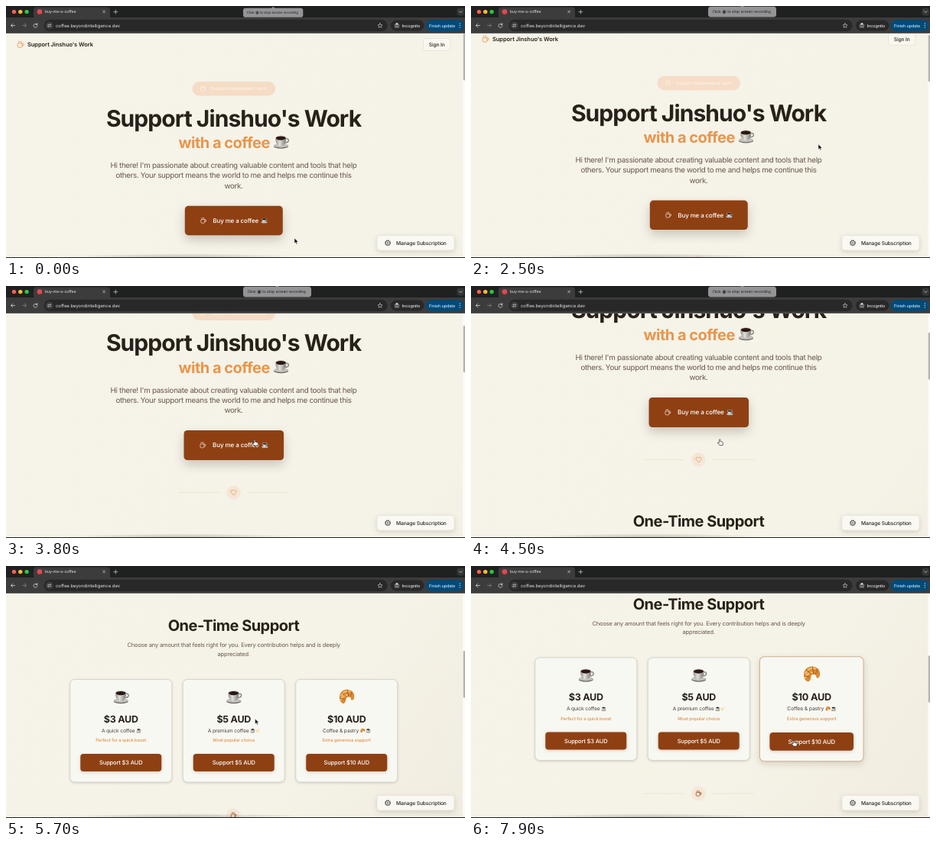
Recreate the animation shown at these times as an HTML page. Size 600 by 330 pixels, loop 8 s.

```html
<!DOCTYPE html>
<html lang="en">
<head>
<meta charset="utf-8">
<title>Coffee page</title>
<style>
  html, body { margin: 0; width: 100%; height: 100%; overflow: hidden; background: #f5f2e7; }
  svg { display: block; width: 600px; height: 330px; }
  text { font-family: Inter, "Open Sans", sans-serif; text-rendering: geometricPrecision; white-space: pre; }
  .line { fill: none; stroke-linecap: round; stroke-linejoin: round; }
  .zoom { transform-box: fill-box; transform-origin: center; }
</style>
</head>
<body>
<svg id="stage" viewBox="0 0 600 330" xmlns="http://www.w3.org/2000/svg"></svg>
<script>
const LOOP = 8000, STEP = 100;
const INK = '#27211a', SOFT = '#67584e', ORANGE = '#e8964b', BROWN = '#8e4013';

// y is the middle of the line; the baseline sits 0.36em lower
const text = (s, x, y, size, { w = 400, c = INK, a = 'start', ls = -0.015 } = {}) =>
  `<text x="${x}" y="${y + size * 0.36}" font-size="${size}" font-weight="${w}" fill="${c}" text-anchor="${a}" letter-spacing="${ls * size}">${s}</text>`;
const mid = (s, x, y, size, o) => text(s, x, y, size, { a: 'middle', ...o });
const rect = (x, y, w, h, r, fill, more = '') =>
  `<rect x="${x}" y="${y}" width="${w}" height="${h}" rx="${r}" fill="${fill}" ${more}/>`;
const dot = (x, y, r, fill, more = '') => `<circle cx="${x}" cy="${y}" r="${r}" fill="${fill}" ${more}/>`;
const ring = (x, y, r, c, w, more = '') => dot(x, y, r, 'none', `stroke="${c}" stroke-width="${w}" ${more}`);
const line = (d, c, w = 0.8) => `<path class="line" d="${d}" stroke="${c}" stroke-width="${w}"/>`;
const use = (id, x, y, size) =>
  `<use href="#${id}" transform="translate(${x} ${y}) scale(${size / 20})"/>`;

// 24-unit line icons, centred on x, y
const ICONS = {
  cup: 'M10 2v2M14 2v2M6 2v2M16 8a1 1 0 0 1 1 1v8a4 4 0 0 1-4 4H7a4 4 0 0 1-4-4V9a1 1 0 0 1 1-1h14a4 4 0 1 1 0 8h-1',
  heart: 'M19 14c1.5-1.5 3-3.2 3-5.5A5.5 5.5 0 0 0 16.5 3c-1.8 0-3 .5-4.5 2-1.5-1.5-2.7-2-4.5-2A5.5 5.5 0 0 0 2 8.5c0 2.3 1.5 4 3 5.5l7 7Z'
};
const icon = (name, x, y, size, c) =>
  `<g transform="translate(${x - size / 2} ${y - size / 2}) scale(${size / 24})">${line(ICONS[name], c, 2)}</g>`;

const defs = `<defs>
  <linearGradient id="bg" x1="0" y1="0" x2="1" y2="1">
    <stop offset="0" stop-color="#f6f3e9"/><stop offset=".65" stop-color="#f5f2e7"/><stop offset="1" stop-color="#efe9dd"/>
  </linearGradient>
  <linearGradient id="china" x1="0" y1="0" x2="1" y2="0">
    <stop offset="0" stop-color="#8f8c87"/><stop offset=".4" stop-color="#e2e0dc"/><stop offset="1" stop-color="#76736e"/>
  </linearGradient>
  <radialGradient id="haze"><stop offset="0" stop-color="#555" stop-opacity=".4"/><stop offset="1" stop-color="#555" stop-opacity="0"/></radialGradient>
  <clipPath id="view"><rect x="0" y="35.8" width="600" height="294.2"/></clipPath>
  <g id="coffee">
    <ellipse cx="0" cy="6" rx="9.3" ry="3" fill="#6f6b66"/>
    <ellipse cx="0" cy="5" rx="9.3" ry="2.7" fill="#c4c1bc"/>
    <path d="M6-3.5c5-1.5 5 5-.8 5" fill="none" stroke="#8b8883" stroke-width="1.4"/>
    <path d="M-7.2-4.5C-7 2-4.5 5.8-.3 5.8S6.500 2 6.700-4.5z" fill="url(#china)"/>
    <ellipse cx="-.2" cy="-4.5" rx="7.1" ry="3.2" fill="#d6d3ce"/>
    <ellipse cx="-.2" cy="-4.3" rx="6.4" ry="2.6" fill="#2c1a12"/>
  </g>
  <g id="croissant">
    <path d="M-9 1C-9.5-5-4-10 2-8.8C8-8 11-3 9.5 2c-.6 2-2 3-3 2.5C5 4 6 1 3.5.5C0 0-.5 2-1 4.5C-1.500 8-3.5 9.8-5.5 8.5C-8 7-9 4-9 1z" fill="#d98a36"/>
    <path d="M-7-1C-5-6 0-8 4-6.5M-7.5 4c2-4 5-6 8-6" fill="none" stroke="#f2bd6c" stroke-width="2" stroke-linecap="round"/>
    <path d="M-6-5l5 4.5M1-8.5L2.5 0M7-6L4.5 0M-9 2l7 1.5" fill="none" stroke="#a85c1c" stroke-width=".9"/>
  </g>
  <path id="sparkle" d="M-2-7L0 0l7 2L0 4l-2 7-2-7-6-2 6-2zM6-9l1 3 3 1-3 1-1 3-1-3-3-1 3-1z" fill="#f3d48a"/>
</defs>`;

const separator = (y, name, c) =>
  line(`M225 ${y}H279M316 ${y}H370`, '#e4dccb', 0.6) + dot(297.5, y, 9.2, '#f5e6d6') + icon(name, 297.5, y, 8.6, c);

const CARDS = [
  { x: 150.25, sum: 3, emoji: 'coffee', name: 'A quick coffee', end: 168.5, extra: [['coffee', 173.4]], note: 'Perfect for a quick boost' },
  { x: 297.75, sum: 5, emoji: 'coffee', name: 'A premium coffee', end: 317.5, extra: [['coffee', 322.4], ['sparkle', 329.2]], note: 'Most popular choice' },
  { x: 445.25, sum: 10, emoji: 'croissant', name: 'Coffee &amp; pastry', end: 461, extra: [['croissant', 466.2], ['coffee', 473.4]], note: 'Extra generous support' }
];
const card = (c, i) => `<g id="card${i}" class="zoom">
  ${rect(c.x - 66.5, 493.5, 133, 134.5, 6, '#f8f8f3', `id="box${i}" stroke-width="1"`)}
  <g id="pic${i}" class="zoom">${use(c.emoji, c.x, 516, 20.5)}</g>
  ${mid(`$${c.sum} AUD`, c.x, 545, 12.5, { w: 700, ls: -0.02 })}
  ${text(c.name, c.end, 560.5, 6.67, { c: '#4c423a', a: 'end', ls: -0.02 })}
  ${c.extra.map(([id, x]) => use(id, x, 560.5, 6.4)).join('')}
  ${mid(c.note, c.x, 573, 5.83, { w: 500, c: '#e08f45', ls: -0.018 })}
  <g id="pay${i}" class="zoom" style="filter:drop-shadow(0 1.5px 2px #8e401340)">
    ${rect(c.x - 53, 591, 106, 23, 4, BROWN)}${mid(`Support $${c.sum} AUD`, c.x, 602.5, 7.5, { w: 500, c: '#fff', ls: -0.02 })}
  </g></g>`;

const page = `<g clip-path="url(#view)"><g id="page">
  ${rect(0, 0, 600, 900, 0, 'url(#bg)')}
  ${icon('cup', 19, 50.5, 10, ORANGE)}
  ${text("Support Jinshuo's Work", 28, 50.5, 7.5, { w: 600, ls: -0.008 })}
  ${rect(545.5, 42.5, 35.5, 16, 3.5, '#f9f7ef', 'stroke="#dfd9cb" stroke-width=".6"')}
  ${mid('Sign In', 563.2, 50.5, 6.67, { w: 500 })}
  <g id="badge">${rect(243.5, 99, 108.5, 18.5, 9.25, '#f5dcc5')}
    ${icon('cup', 257.5, 108, 8, '#fdf3e8')}
    ${text('Support independent work', 267.5, 108.2, 5.83, { w: 500, c: '#fdf3e8', ls: -0.005 })}</g>
  ${mid("Support Jinshuo's Work", 297.5, 147, 30, { w: 700, ls: -0.031 })}
  ${text('with a coffee', 225.5, 179, 20, { w: 700, c: ORANGE, ls: -0.025 })}
  ${use('coffee', 359.5, 177.5, 20.5)}
  ${["Hi there! I'm passionate about creating valuable content and tools that help",
     'others. Your support means the world to me and helps me continue this', 'work.']
    .map((s, i) => mid(s, 297.5, 208.6 + i * 13.33, 9.8, { c: SOFT, ls: -0.033 })).join('')}
  <g id="hero" class="zoom" style="filter:drop-shadow(0 6px 7px #00000030)">
    ${rect(233.8, 261.8, 128, 38.4, 4.6, BROWN)}${icon('cup', 258, 281, 8.6, '#f7e6d8')}
    ${text('Buy me a coffee', 270.5, 281, 7.95, { w: 500, c: '#fff' })}${use('coffee', 337.5, 281, 8.6)}
  </g>
  ${separator(343, 'heart', ORANGE)}
  ${mid('One-Time Support', 297.5, 423, 20, { w: 700, ls: -0.027 })}
  ${['Choose any amount that feels right for you. Every contribution helps and is deeply', 'appreciated.']
    .map((s, i) => mid(s, 297.7, 448.3 + i * 11.67, 7.5, { c: SOFT, ls: -0.02 })).join('')}
  ${CARDS.map(card).join('')}
  ${separator(671.5, 'cup', BROWN)}
</g>
${rect(597, 35, 3, 295, 0, '#fafaf6')}${rect(597.7, 36, 2.3, 61.5, 1.1, '#b4b4b0', 'id="thumb"')}
<g style="filter:drop-shadow(0 2px 3px #0002)">${rect(485, 300.5, 101, 19.5, 4, '#faf8f2', 'stroke="#e6e1d6" stroke-width=".6"')}</g>
${ring(499, 310.2, 2.9, INK, 0.7)}${ring(499, 310.2, 3.6, INK, 0.8, 'stroke-dasharray="1.414"')}${ring(499, 310.2, 1.1, INK, 0.6)}
${text('Manage Subscription', 510, 310.3, 6.67, { w: 500 })}
<ellipse cx="230" cy="330" rx="160" ry="6" fill="url(#haze)"/>
${rect(0, 329, 600, 1, 0, '#1f1f1f')}
</g>`;

const FRAME = '#1f2020', BAR = '#3c3c3c', FIELD = '#282828', GREY = '#d5d6d8', SKY = '#c9e6ff';
const browser = rect(0, 0, 600, 16, 0, FRAME) + rect(0, 15, 600, 20.8, 0, BAR)
  + rect(36, 1.5, 100, 16, 4, BAR)
  + ['#ff5f57', '#febc2e', '#28c840'].map((c, i) => dot(10.5 + i * 8.3, 7.6, 2.7, c)).join('')
  + dot(44, 7.6, 3.3, '#e5484d') + text('buy-me-a-coffee', 51, 7.6, 5.1, { c: '#e8e8ea' })
  + line('M126.6 6l3 3M129.6 6l-3 3M143.3 5.2v5M140.8 7.7h5', GREY, 0.7)
  + rect(589.5, 2.5, 9.5, 10, 3, '#353637') + line('M592.3 6.7l1.9 1.9 1.9-1.9', GREY, 0.8)
  + line('M11.5 25.5H6.5M8.8 23.2l-2.3 2.3 2.3 2.3', GREY, 0.8)
  + line('M21.5 25.5h5M24.2 23.2l2.3 2.3-2.3 2.3', '#7d7f82', 0.8)
  + line('M40.6 24.3A2.5 2.5 0 1 0 41 26M40.9 22.6v1.9h-1.9', GREY, 0.8)
  + rect(49.5, 17.8, 449, 15.4, 7.7, FIELD) + dot(56.7, 25.5, 5, BAR)
  + line('M54.7 24.3h2M58.7 26.7h-2', GREY, 0.7)
  + ring(58, 24.3, 0.8, GREY, 0.6) + ring(55.4, 26.7, 0.8, GREY, 0.6)
  + text('coffee.beyondintelligence.dev', 65, 25.6, 5.92, { c: '#e6e6e8', ls: 0 })
  + line('M489 22.6l.9 2 2.1.2-1.6 1.4.5 2.1-1.9-1.1-1.9 1.1.5-2.1-1.6-1.4 2.1-.2z', GREY, 0.6)
  + rect(503, 18.5, 43.5, 14.2, 7.1, FIELD)
  + `<path d="M509 24.5l.8-2.3h2.4l.8 2.3z" fill="${GREY}"/>`
  + line('M507.8 25h6.4M510.3 27.3h1.4', GREY, 0.6)
  + ring(509.4, 27.4, 1, GREY, 0.6) + ring(512.6, 27.4, 1, GREY, 0.6)
  + text('Incognito', 517.5, 25.6, 5.45, { w: 500, c: '#e6e6e8', ls: -0.01 })
  + rect(548.5, 18.3, 50, 14.6, 7.3, '#004a77')
  + text('Finish update', 553, 25.6, 5.45, { w: 500, c: SKY, ls: -0.01 })
  + [22.9, 25.5, 28.1].map(y => dot(593.3, y, 0.65, SKY)).join('');

const pill = `<g id="pill"><path d="M350.5 2l4-3 4 3z" fill="#949496"/>${rect(310, 0.8, 89, 13.7, 3.5, '#949496')}
  ${text('Click', 315.5, 7.7, 4.9, { c: '#1d1d1f' })}
  ${ring(331, 7.7, 2.1, '#1d1d1f', 0.6)}${dot(331, 7.7, 1.2, '#1d1d1f')}
  ${text('to stop screen recording', 335.2, 7.7, 4.9, { c: '#1d1d1f', ls: 0 })}</g>`;

const pointer = `<g id="cursor">
  <path id="arrow" d="M0 0v7l1.7-1.5 1.1 2.5 1.2-.5-1.1-2.4h2.2z" fill="#111" stroke="#fff" stroke-width=".5"/>
  <path id="hand" d="M-.8 1a.8.8 0 0 1 1.6 0v2.2l2.6.6c.7.2 1 .6.9 1.4L3.9 8H-.3L-2.7 5.3c-.5-.7.3-1.3 1-.8l.9.7z" fill="#fff" stroke="#222" stroke-width=".65"/>
</g>`;

stage.innerHTML = defs + page + browser + pill + pointer;
const el = id => document.getElementById(id);

// time, value(s)
const SCROLL = [[2300, 0], [2500, 7.2], [2800, 34], [3100, 61], [3400, 72.5], [4000, 72.5], [4200, 82], [4500, 115.5],
  [4900, 215], [5300, 322], [5600, 345], [5800, 345], [6200, 373.5]];
const CURSOR = [[1000, 377, 304], [2100, 454, 181], [2800, 454, 181], [3500, 325, 201], [5700, 325.5, 200],
  [5900, 325, 200], [6700, 198.5, 218], [7000, 198.5, 218], [7700, 422, 228]];
const HAND = [[3250, 5000], [6500, 7050], [7200, 7380], [7500, 8000]];
const HOVER = { hero: [[3250, 5000]], 0: [[6450, 7050]], 1: [[5900, 6350], [7150, 7400]], 2: [[7480, 9000]] };

const clamp = v => Math.max(0, Math.min(1, v));
const smooth = v => v * v * (3 - 2 * v);
function track(keys, t, ease = v => v) {
  const i = keys.findIndex(k => k[0] > t);
  if (i < 0) return keys[keys.length - 1].slice(1);
  if (i === 0) return keys[0].slice(1);
  const a = keys[i - 1], b = keys[i], f = ease((t - a[0]) / (b[0] - a[0]));
  return a.slice(1).map((v, n) => v + (b[n + 1] - v) * f);
}
const hover = (id, t) => HOVER[id].reduce((s, [a, b]) => s + smooth(clamp((t - a) / 250)) - smooth(clamp((t - b) / 250)), 0);
const zoom = (id, k) => { el(id).style.transform = `scale(${k})`; };
const mix = (a, b, f) => `rgb(${a.map((v, i) => Math.round(v + (b[i] - v) * f))})`;

function draw(t) {
  const [scroll] = track(SCROLL, t), [x, y] = track(CURSOR, t, smooth);
  el('page').setAttribute('transform', `translate(0 ${-scroll})`);
  el('thumb').setAttribute('y', 36 + scroll * 0.2175);
  el('cursor').setAttribute('transform', `translate(${x} ${y})`);
  const hand = HAND.some(([a, b]) => t >= a && t < b);
  el('hand').style.display = hand ? '' : 'none';
  el('arrow').style.display = hand ? 'none' : '';

  el('badge').style.opacity = 0.92 + 0.08 * Math.cos(t * Math.PI / 1000);

  // the recording hint pops in from its left edge, then fades
  const pop = 1 - clamp(t / 300);
  el('pill').setAttribute('transform', `translate(${310 * 0.12 * pop} ${2 * pop}) scale(${1 - 0.12 * pop})`);
  el('pill').style.opacity = 1 - clamp((t - 5000) / 300);

  zoom('hero', 1 + 0.02 * hover('hero', t));
  CARDS.forEach((c, i) => {
    const h = hover(i, t);
    zoom('card' + i, 1 + 0.02 * h);
    zoom('pic' + i, 1 + 0.07 * h);
    zoom('pay' + i, 1 + 0.014 * h);
    const box = el('box' + i);
    box.setAttribute('stroke', mix([214, 212, 205], [206, 176, 142], h));
    box.style.filter = `drop-shadow(0 ${1.2 + 2 * h}px ${1.6 + 2.4 * h}px rgba(60,45,30,.17))`;
  });
}

function tick() {
  draw(Math.floor(performance.now() % LOOP / STEP) * STEP);
  requestAnimationFrame(tick);
}
tick();
</script>
</body>
</html>
```
